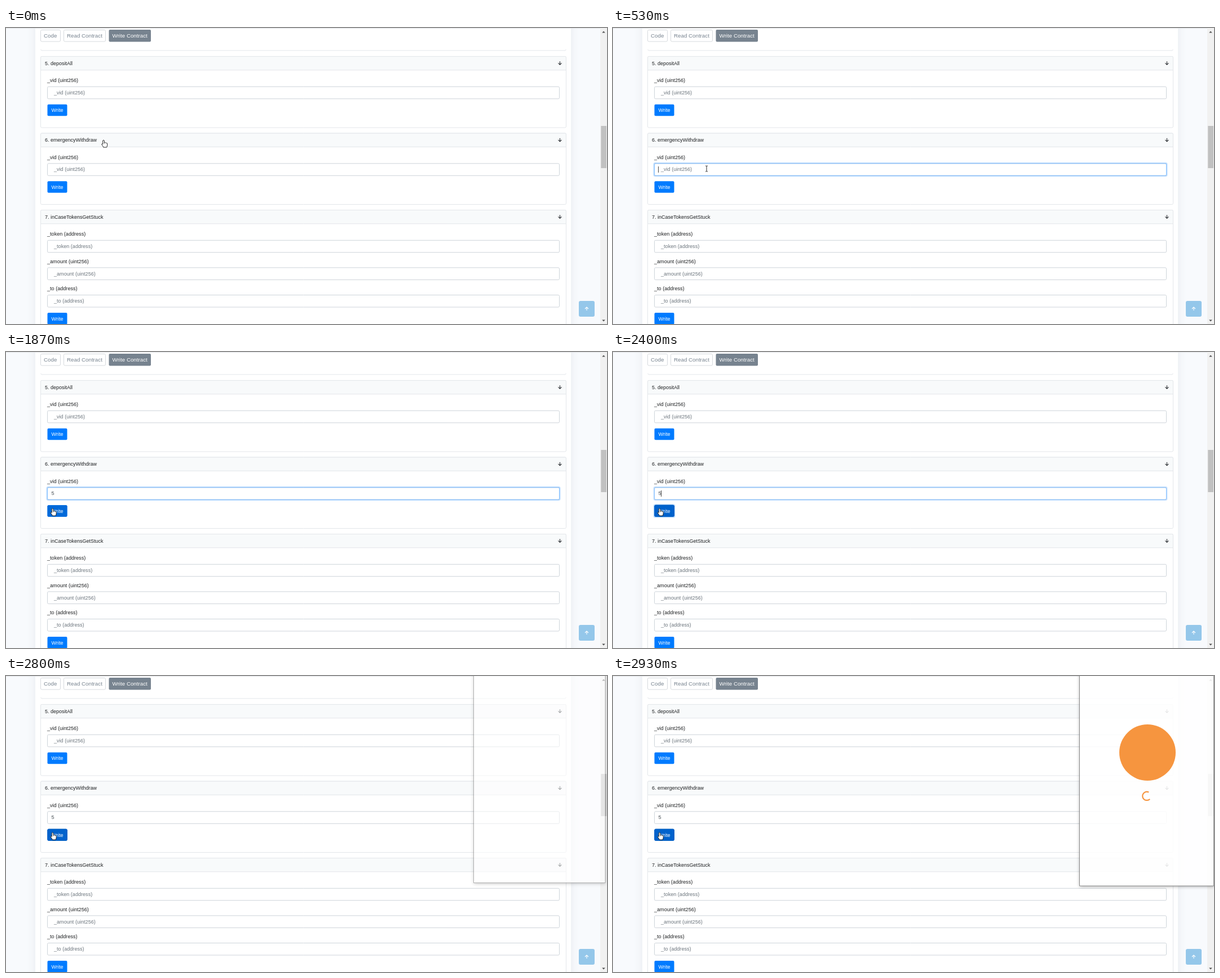
Recreate the animation shown at these times as an HTML page with a canvas. Size 1066 px wide and 526 px high, loop 2990 ms.

```html
<!DOCTYPE html>
<html lang="en">
<head>
<meta charset="utf-8">
<title>Write Contract</title>
<style>
html, body { margin: 0; width: 100%; height: 100%; overflow: hidden; background: #fff; }
canvas { display: block; }
</style>
</head>
<body>
<canvas id="stage" width="1066" height="526"></canvas>
<script>
const ctx = document.getElementById('stage').getContext('2d');
const LOOP = 2990;
const FONT = '"Liberation Sans", Arial, sans-serif';
const BORDER = '#e3e6ea', INK = '#1e2022', GREY = '#77838f', ORANGE = '#f6953f';

// Each track lists [start time, ...values]; values hold until the next start.
const pointerTrack = [
  [0, 'hand', 173, 199], [70, 'beam', 167, 246], [130, 'beam', 166, 250],
  [1070, 'beam', 165, 252], [1530, 'beam', 161, 254], [1600, 'beam', 143, 258],
  [1670, 'arrow', 116, 268], [1730, 'hand', 95, 276], [1800, 'hand', 85, 278],
  [1870, 'hand', 82.5, 278]
];
const glowTrack = [
  [0, 0], [400, .15], [470, .6], [530, 1],
  [2400, .8], [2470, .4], [2530, .15], [2600, .04], [2800, 0]
];
const hoverTrack = [[0, 0], [1730, .3], [1800, .7], [1870, 1]];
const ringTrack = [[0, 0], [2400, .25], [2470, .2], [2530, 0]];
const caretTrack = [[0, 0], [400, 80.5], [930, 0], [1330, 85.5], [1870, 0], [2400, 85.5], [2470, 0]];
const popupTrack = [
  [0], [2800, 829.5, 1063, 367.5, .58], [2870, 828.5, 1064.5, 371, .76], [2930, 827.5, 1065.5, 373, .88]
];
const at = (track, t) => track.findLast(k => t >= k[0]).slice(1);

const handPath = new Path2D('M-1.3 1Q0-.9 1.3 1V4.6Q2.6 3.9 3.2 5Q4.5 4.3 5 5.5Q6.6 5.1 6.7 6.8V9.2Q6.5 11 5.6 13H-.2Q-.6 11.4-2.2 9.5L-3.5 7.5Q-3.2 6.1-1.3 7.4Z');
const arrowPath = new Path2D('M0 0V10L2.3 7.9L3.8 11.4L5.4 10.7L3.9 7.3H7Z');
const beamPath = new Path2D('M-2-5H-.5L0-4.5L.5-5H2M0-4.5V4.5M-2 5H-.5L0 4.5L.5 5H2');

function rect(x, y, w, h, fill, stroke, r = 2) {
  ctx.beginPath();
  ctx.roundRect(x, y, w, h, r);
  if (fill) { ctx.fillStyle = fill; ctx.fill(); }
  if (stroke) { ctx.lineWidth = 1; ctx.strokeStyle = stroke; ctx.stroke(); }
}

function text(str, x, y, color = INK, size = 9.05) {
  ctx.font = `${size}px ${FONT}`;
  ctx.fillStyle = color;
  ctx.fillText(str, x, y);
}

function line(points, color, width = 1) {
  ctx.beginPath();
  points.forEach(([x, y]) => ctx.lineTo(x, y));
  ctx.strokeStyle = color;
  ctx.lineWidth = width;
  ctx.stroke();
}

// dir is 1 for down and -1 for up
function arrow(x, y, dir, color) {
  line([[x, y - 3 * dir], [x, y + 3 * dir]], color, 1.1);
  line([[x - 3, y], [x, y + 3 * dir], [x + 3, y]], color, 1.1);
}

function triangle(x, y, dir) {
  ctx.beginPath();
  ctx.moveTo(x - 2.8, y - 1.4 * dir);
  ctx.lineTo(x + 2.8, y - 1.4 * dir);
  ctx.lineTo(x, y + 1.6 * dir);
  ctx.fillStyle = '#505050';
  ctx.fill();
}

function writeButton(y) {
  rect(73.5, y, 35, 20.6, '#007bff');
  text('Write', 80.6, y + 13.6, '#fff');
}

function card(y, title, fields, h) {
  rect(61.5, y, 932, h, '#fff', BORDER);
  rect(61.5, y, 932, 24.3, '#f8fafb', BORDER, [2, 2, 0, 0]);
  text(title, 69, y + 15.4, INK, 9);
  arrow(982.5, y + 11.8, 1, '#212529');
  fields.forEach((name, i) => {
    const top = y + i * 48.6;
    text(name, 73, top + 45.6, INK, 9.1);
    rect(73.5, top + 53.8, 908, 21.5, '#fff', '#ced4da');
    text(name, 85, top + 67.4, '#6c757d', 9.1);
  });
  writeButton(y + 36.6 + fields.length * 48.6);
}

function page() {
  ctx.fillStyle = '#f8fafd';
  ctx.fillRect(0, 0, 1066, 526);
  ctx.save();
  ctx.shadowColor = 'rgba(140,152,164,.16)';
  ctx.shadowBlur = 14;
  ctx.fillStyle = '#fff';
  ctx.fillRect(52, -30, 950, 590);
  ctx.restore();
  line([[0, .5], [1054, .5]], '#e3e5e8');

  rect(61.5, 3.5, 35, 20.5, '#fff', '#d6dade');
  text('Code', 67, 17.2, GREY, 9.75);
  rect(102.5, 3.5, 74, 20.5, '#fff', '#d6dade');
  text('Read Contract', 108, 17.2, GREY, 9.75);
  rect(182.5, 3, 74.5, 21.5, GREY);
  text('Write Contract', 188.6, 17.2, '#fff', 9.75);
  line([[61.5, 38], [63, 40], [992, 40], [993.5, 38]], BORDER);

  card(50.5, '5. depositAll', ['_vid (uint256)'], 126.5);
  card(187, '6. emergencyWithdraw', ['_vid (uint256)'], 126.5);
  card(323.5, '7. inCaseTokensGetStuck', ['_token (address)', '_amount (uint256)', '_to (address)'], 230);

  rect(1016, 485, 28, 28, '#94c7ea', null, 3);
  arrow(1030, 499, -1, '#fff');

  ctx.fillStyle = '#f1f1f1';
  ctx.fillRect(1054, 0, 12, 526);
  ctx.fillStyle = '#c1c1c1';
  ctx.fillRect(1055.3, 174, 9.7, 75);
  triangle(1060, 7, -1);
  triangle(1060, 520, 1);
}

function activeField(t) {
  const [glow] = at(glowTrack, t), [caret] = at(caretTrack, t);
  if (glow) {
    rect(71.5, 239, 912, 25, `rgba(0,123,255,${.25 * glow})`, null, 3);
    rect(73.5, 240.8, 908, 21.5, '#fff', '#ced4da');
    rect(73.5, 240.8, 908, 21.5, null, `rgba(128,189,255,${Math.min(1, glow * 5)})`);
  }
  if (t >= 1330) {
    rect(74.5, 242, 80, 19, '#fff', null, 0);
    text('5', 80.5, 254.4, '#495057');
  } else if (glow) {
    text('_vid (uint256)', 85, 254.4, '#6c757d', 9.1);
  }
  if (caret) line([[caret, 246], [caret, 257]], '#333', .9);
}

function activeButton(t) {
  const [hover] = at(hoverTrack, t), [ring] = at(ringTrack, t);
  if (ring) rect(71.7, 270.4, 38.6, 24.2, `rgba(0,123,255,${ring})`, null, 3);
  if (!hover) return;
  if (t < 2400) rect(73.5, 272.2, 35, 20.6, `rgba(0,105,217,${hover})`);
  else rect(73.8, 272, 34.6, 20.4, '#0062cc', '#005cbf');
  text('Write', 80.6, 285.8, '#fff');
}

function pointer(t) {
  const [kind, x, y] = at(pointerTrack, t);
  ctx.save();
  ctx.translate(x, y);
  ctx.lineWidth = .9;
  ctx.strokeStyle = '#111';
  if (kind === 'beam') {
    ctx.stroke(beamPath);
  } else {
    const shape = kind === 'hand' ? handPath : arrowPath;
    ctx.fillStyle = '#fff';
    ctx.fill(shape);
    ctx.stroke(shape);
    if (kind === 'hand') line([[1.3, 4.6], [1.3, 7]], '#111', .6);
  }
  ctx.restore();
}

function popup(t) {
  const [left, right, bottom, alpha] = at(popupTrack, t);
  if (!left) return;
  const w = right - left;
  // Shadow only outside the translucent window
  ctx.save();
  ctx.beginPath();
  ctx.rect(0, 0, 1066, 526);
  ctx.rect(left, -10, w, bottom + 10);
  ctx.clip('evenodd');
  ctx.shadowColor = `rgba(0,0,0,${.4 * alpha})`;
  ctx.shadowBlur = 6;
  ctx.shadowOffsetY = 1;
  ctx.fillStyle = '#fff';
  ctx.fillRect(left, -10, w, bottom + 10);
  ctx.restore();

  rect(left, -10, w, bottom + 10, `rgba(255,255,255,${alpha})`, `rgba(110,110,110,${alpha * .9})`, 0);
  if (t < 2930) return;
  ctx.beginPath();
  ctx.arc(948, 136, 50, 0, Math.PI * 2);
  ctx.fillStyle = ORANGE;
  ctx.fill();
  ctx.beginPath();
  ctx.arc(946.8, 213.3, 7.6, Math.PI * .25, Math.PI * 1.65);
  ctx.strokeStyle = ORANGE;
  ctx.lineWidth = 2.2;
  ctx.stroke();
}

const start = performance.now();
function frame() {
  const t = (performance.now() - start) % LOOP;
  page();
  activeField(t);
  activeButton(t);
  pointer(t);
  popup(t);
  requestAnimationFrame(frame);
}
frame();
</script>
</body>
</html>
```
